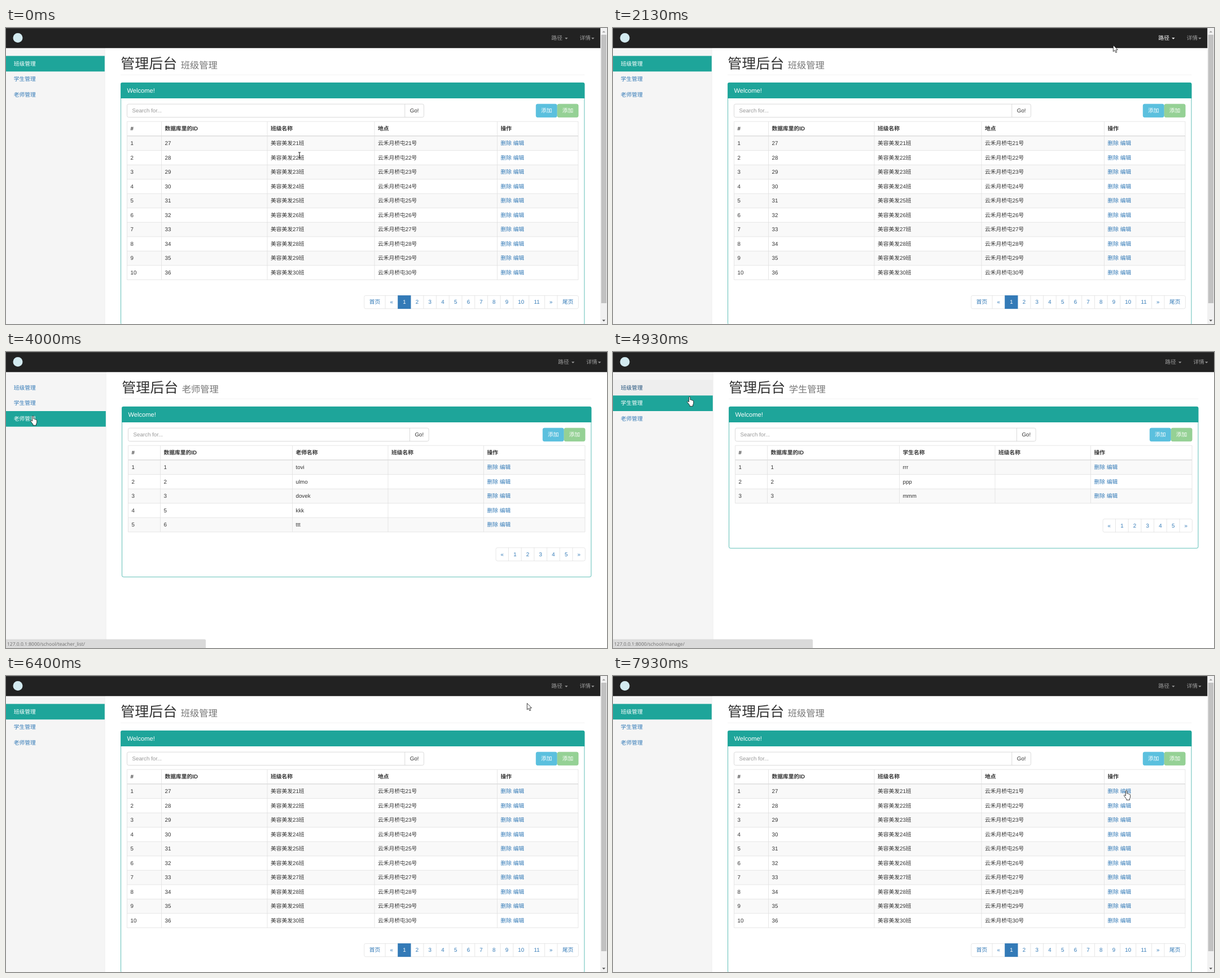
These frames come from a looping animation (1065 px wide and 526 px high, 8000 ms). An HTML page:

```html
<!DOCTYPE html>
<html lang="zh-CN">
<head>
<meta charset="utf-8">
<title>管理后台</title>
<style>
html, body { margin: 0; width: 100%; height: 100%; overflow: hidden; background: #fff; }
svg { display: block; width: 1065px; height: 526px; }
text { font: 9.75px "Liberation Sans", "Noto Sans CJK SC", "Noto Sans CJK", sans-serif; white-space: pre; text-rendering: geometricPrecision; }
.status { font: 8.5px "Open Sans", "Noto Sans", sans-serif; }
</style>
</head>
<body>
<svg id="stage" viewBox="0 0 1065 526"></svg>
<script>
const TEAL = '#1ea59a', LINK = '#337ab7', LINK_HOVER = '#23527c', LINE = '#ddd';
const LOOP = 8000, TICK = 1000 / 15;
const HAIR = .7;
const HOST = '127.0.0.1:8000/school/';
const MENU = ['班级管理', '学生管理', '老师管理'];

const rect = (x, y, w, h, fill, extra = '') =>
  `<rect x="${x}" y="${y}" width="${w}" height="${h}" fill="${fill}" ${extra}/>`;
const box = (x, y, w, h, fill, stroke, r = 2.8) =>
  rect(x, y, w, h, fill, `stroke="${stroke}" stroke-width="${HAIR}" rx="${r}"`);
const path = (d, fill, extra = '') => `<path d="${d}" fill="${fill}" ${extra}/>`;
const line = (d, stroke = LINE, width = HAIR) =>
  path(d, 'none', `stroke="${stroke}" stroke-width="${width}"`);
// y is the vertical centre of the text
const text = (s, x, y, fill = '#333', { size = 9.75, bold, mid } = {}) =>
  `<text x="${x}" y="${y + size * .36}" fill="${fill}" style="font-size:${size}px${bold ? ';font-weight:700' : ''}"` +
  `${mid ? ' text-anchor="middle"' : ''}>${s}</text>`;

const numbers = (n, from = 1) => Array.from({ length: n }, (_, i) => String(from + i));

const people = (title, ids, names) => ({
  right: 1065, title, edges: [216.5, 273.5, 507.5, 677, 846.5, 1026],
  head: ['#', '数据库里的ID', title.slice(0, 2) + '名称', '班级名称', '操作'],
  rows: names.map((name, i) => [i + 1, ids[i], name, '']),
  pages: ['«', ...numbers(5), '»'], searchEnd: 715.5
});

const PAGES = [
  {
    right: 1053.2, title: MENU[0], edges: [214.5, 275.5, 463, 653, 870.5, 1014],
    head: ['#', '数据库里的ID', '班级名称', '地点', '操作'],
    rows: numbers(10).map((n, i) => [n, 27 + i, `美容美发${21 + i}班`, `云禾月桥屯${21 + i}号`]),
    pages: ['首页', '«', ...numbers(11), '»', '尾页'], current: '1', searchEnd: 706.8
  },
  people(MENU[1], [1, 2, 3], ['rrr', 'ppp', 'mmm']),
  people(MENU[2], [1, 2, 3, 5, 6], ['tovi', 'ulmo', 'dovek', 'kkk', 'ttt'])
];

function drawTable({ edges, head, rows }) {
  const left = edges[0], right = edges[5], top = 166.2, first = 192.2, step = 25.52;
  const bottom = first + rows.length * step;
  let out = head.map((s, i) => text(s, edges[i] + 6, 178.7, '#333', { bold: true })).join('');
  let grid = `M${left} ${top}H${right}`;
  rows.forEach((row, r) => {
    const y = first + r * step, mid = y + 12.4;
    if (r % 2 === 0) out += rect(left, y, right - left, step, '#f9f9f9');
    row.forEach((s, i) => out += text(s, edges[i] + 6, mid));
    out += text('删除 编辑', edges[4] + 6, mid, LINK);
    grid += `M${left} ${y + step}H${right}`;
  });
  edges.forEach(x => grid += `M${x} ${top}V${bottom}`);
  return { bottom, svg: out + line(grid) + line(`M${left} 191.7H${right}`, LINE, 2 * HAIR) };
}

function drawPager({ pages, current, edges }, y) {
  const width = s => /[«»]/.test(s) ? 22.4 : /\d\d/.test(s) ? 27.9 : /\d/.test(s) ? 22.7 : 37.4;
  const total = pages.reduce((sum, s) => sum + width(s), 0);
  let x = edges[5] + .4 - total;
  let out = box(x, y, total, 23.4, '#fff', LINE);
  pages.forEach((s, i) => {
    const w = width(s), on = s === current;
    if (on) out += rect(x - .3, y - .3, w + .6, 24, LINK);
    else if (i && pages[i - 1] !== current) out += line(`M${x} ${y}v23.4`);
    out += text(s, x + w / 2, y + 11.5, on ? '#fff' : LINK, { mid: true });
    x += w;
  });
  return out;
}

function drawScrollbar() {
  return rect(1053.2, 0, 11.8, 526, '#f1f1f1') + rect(1054.7, 12, 9.3, 477, '#c1c1c1') +
    path('M1056.5 8l2.8-3 2.8 3z', '#a3a3a3') + path('M1056.5 518.5l2.8 3 2.8-3z', '#505050');
}

function drawContent(page) {
  const { edges, searchEnd, right, title } = page;
  const left = edges[0] - 11.3, end = edges[5] + 11.3, go = searchEnd;
  const table = drawTable(page);
  const add = (x, fill, stroke) => box(x, 135.2, 37, 23.4, fill, stroke) + text('添加', x + 18.5, 146.7, '#fff', { mid: true });
  return text('管理后台', left, 63.3, '#333', { size: 25 }) +
    text(title, left + 106.5, 66.2, '#777', { size: 16.3 }) +
    line(`M${left} 83.2H${end}`, '#eee') +
    box(left + HAIR / 2, 97.3, end - left - HAIR, table.bottom + 80 - 97.3, '#fff', TEAL) +
    path(`M${left} 125V99.5q0-2.5 2.5-2.5H${end - 2.5}q2.5 0 2.5 2.5V125z`, TEAL) +
    text('Welcome!', edges[0], 111, '#fff', { size: 11.15 }) +
    box(edges[0], 135.2, go + 33.7 - edges[0], 23.4, '#fff', '#ccc') +
    line(`M${go} 135.2v23.4`, '#ccc') +
    text('Search for...', edges[0] + 9, 146.5, '#999') +
    text('Go!', go + 9, 146.5) +
    add(edges[5] - 74.7, '#5bc0de', '#46b8da') + add(edges[5] - 36.9, '#95d195', '#8acb8a') +
    table.svg + drawPager(page, table.bottom + 28) +
    (right < 1065 ? drawScrollbar() : '');
}

function drawNav(right, lit) {
  const item = (s, x, caret, fill) => text(s, x, 17.7, fill) + path(`M${caret} 17.2h5.4l-2.7 2.9z`, fill);
  return rect(0, 0, right, 35.4, '#222') + rect(0, 35.4 - HAIR, right, HAIR, '#080808') + rect(0, 0, right, .6, '#505050') +
    `<circle cx="21" cy="17.5" r="8.5" fill="#d3eaf0"/>` +
    item('路径', right - 86.7, right - 63, lit ? '#fff' : '#9d9d9d') +
    item('详情', right - 36.8, right - 16, '#9d9d9d');
}

function drawSidebar(right, active, hover) {
  const w = right / 6, h = 27.7;
  return rect(0, 35.4, w, 490.6, '#f5f5f5') + line(`M${w - HAIR / 2} 35.4V526`, '#eee') +
    MENU.map((s, i) => {
      const y = 49.6 + i * h, on = i === active, over = i === hover;
      return (on || over ? rect(0, y, w - HAIR, h, on ? TEAL : '#eee') : '') +
        text(s, 13.8, y + 13.4, on ? '#fff' : over ? LINK_HOVER : LINK);
    }).join('');
}

const drawStatus = s => s && path('M0 510.5H352q2 0 2 2V526H0z', '#dadada') +
  `<text class="status" x="2" y="521.8" fill="#6c6c6c">${HOST + s}</text>`;

const INK = 'stroke="#111" stroke-width=".8" stroke-linejoin="round"';
const CURSORS = {
  beam: line('M-2-5h1.3q.7 0 .7.7q0-.7.7-.7h1.3M0-4.5v9M-2 5h1.3q.7 0 .7-.7q0 .7.7.7h1.3', '#111', 1),
  arrow: path('M.4.5V11.9L3 9.5l1.9 4.2 1.9-.8L5 8.8h3.5z', '#fff', INK),
  hand: path('M3.5 10V1.8q0-1.3 1.2-1.3t1.2 1.3V6q1.8-.7 2.1.6 1.7-.5 2 .8 1.7-.3 1.7 1.3v3.2q0 1.4-1.2 3v2.4H4.9v-1.7L1 10.5Q0 8.9 1.2 8.4q1-.2 2.3 1.6z', '#fff', INK)
};

// tick, x, y, shape
const POINTER = [
  [0, 520, 226, 'beam'], [1, 520, 226, 'beam'], [2, 532, 232, 'arrow'], [6, 614, 274, 'arrow'],
  [15, 614, 274, 'arrow'], [19, 665, 291, 'arrow'], [24, 840, 195, 'arrow'], [28, 959, 46, 'arrow'],
  [29, 964, 24, 'hand'], [30, 960, 26, 'hand'], [31, 935, 28, 'arrow'], [32, 886, 30, 'arrow'],
  [36, 420, 112, 'arrow'], [38, 110, 144, 'arrow'], [39, 3, 148, 'arrow'], [41, 8, 147, 'arrow'],
  [42, 16, 128, 'hand'], [45, 40, 92, 'hand'], [47, 42, 97, 'hand'], [49, 43, 112, 'hand'],
  [55, 43, 112, 'hand'], [56, 43, 113, 'hand'], [60, 43, 113, 'hand'], [63, 58, 92, 'hand'],
  [64, 60, 90, 'hand'], [67, 70, 74, 'hand'], [69, 70, 74, 'hand'], [70, 71, 74, 'hand'],
  [73, 71, 74, 'hand'], [75, 190, 84, 'arrow'], [78, 648, 112, 'arrow'], [81, 648, 112, 'arrow'],
  [88, 699, 177, 'arrow'], [90, 700, 177, 'arrow'], [96, 923, 48, 'arrow'], [99, 955, 36, 'arrow'],
  [100, 960, 22, 'hand'], [103, 964, 24, 'hand'], [104, 965, 35, 'arrow'], [110, 915, 120, 'arrow'],
  [116, 872, 204, 'arrow'], [117, 880, 203, 'hand'], [119, 905, 203, 'hand']
];

// tick, page, hovered menu item, nav link lit, status address
const SCENES = [
  [0, 0, -1, 0, ''], [29, 0, -1, 1, ''], [33, 0, -1, 0, ''],
  [42, 0, 2, 0, 'teacher_list/'], [44, 0, 1, 0, 'student_list/'], [48, 0, 1, 0, 'teacher_list/'],
  [50, 2, -1, 0, 'teacher_list/'], [62, 2, 1, 0, 'student_list/'], [64, 1, -1, 0, 'student_list/'],
  [66, 1, 0, 0, 'manage/'], [76, 0, -1, 0, 'manage/'], [84, 0, -1, 0, ''],
  [100, 0, -1, 1, ''], [104, 0, -1, 0, ''], [105, 0, -1, 0, 'manage/#'], [108, 0, -1, 0, '']
];

const lastIndex = (list, tick) => list.findLastIndex(entry => entry[0] <= tick);
const contents = PAGES.map(drawContent);
const stage = document.getElementById('stage');

function drawPointer(tick) {
  const i = lastIndex(POINTER, tick);
  const [t0, x0, y0, shape] = POINTER[i];
  const [t1, x1, y1] = POINTER[i + 1] || [t0 + 1, x0, y0];
  const p = (tick - t0) / (t1 - t0);
  const x = Math.round(x0 + (x1 - x0) * p), y = Math.round(y0 + (y1 - y0) * p);
  return `<g transform="translate(${x} ${y})">${CURSORS[shape]}</g>`;
}

function render(tick) {
  const [, page, hover, lit, status] = SCENES[lastIndex(SCENES, tick)];
  const { right } = PAGES[page];
  stage.innerHTML = rect(0, 0, 1065, 526, '#fff') + drawSidebar(right, page, hover) + contents[page] +
    drawNav(right, lit) + drawStatus(status) + drawPointer(tick);
}

let shown = -1;
const start = performance.now();
function update() {
  const time = (performance.now() - start) % LOOP;
  const tick = Math.min(119, Math.floor((time + 7) / TICK));
  if (tick !== shown) render(shown = tick);
  requestAnimationFrame(update);
}
update();
</script>
</body>
</html>
```
